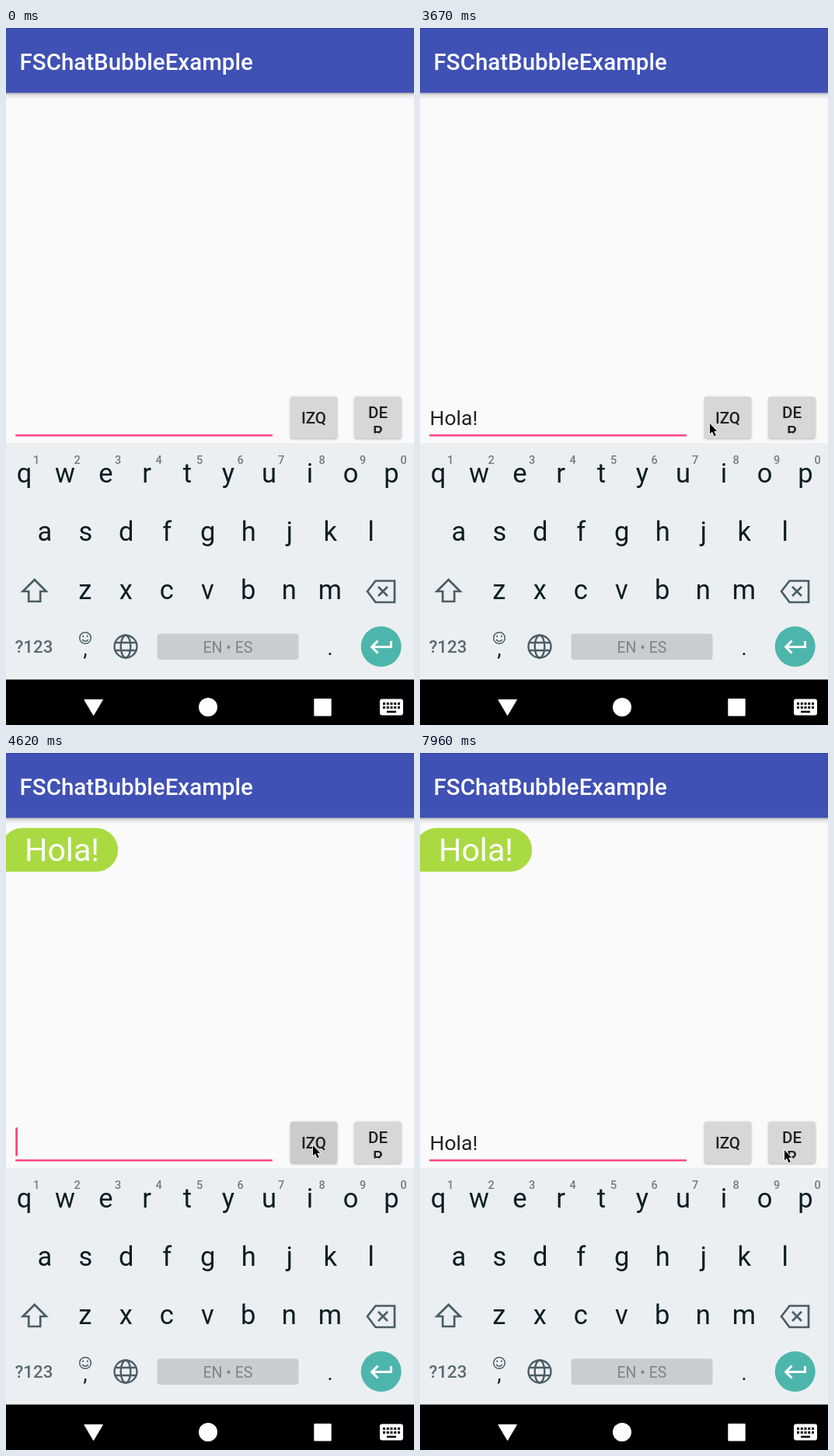
An HTML page that plays this animation: 525x897 px, repeating every 8 s.

```html
<!DOCTYPE html>
<html lang="es">
<head>
<meta charset="utf-8">
<title>Chat bubble demo</title>
<style>
html, body { margin: 0; width: 100%; height: 100%; overflow: hidden; background: #fafafa; }
svg { display: block; width: 525px; height: 897px; font-family: Roboto, sans-serif; }
.mid { text-anchor: middle; }
.label { font-size: 20.6px; font-weight: 500; fill: #202121; text-anchor: middle; }
.button { fill: #d6d7d7; filter: drop-shadow(0 1.5px 1.5px rgba(0,0,0,.3)); }
.key { font-size: 34.5px; fill: #0c1d24; text-anchor: middle; }
.digit { font-size: 14.5px; font-weight: 500; fill: #717b80; text-anchor: middle; }
.icon { fill: none; stroke: #4a5d67; stroke-width: 2.7; }
</style>
</head>
<body>
<svg viewBox="0 0 525 897">
  <defs>
    <linearGradient id="shade" x2="0" y2="1">
      <stop stop-color="#000" stop-opacity=".3"/>
      <stop offset=".4" stop-color="#000" stop-opacity=".09"/>
      <stop offset="1" stop-color="#000" stop-opacity="0"/>
    </linearGradient>
    <clipPath id="cut"><path d="M448 474h61v47.5h-61z"/></clipPath>
  </defs>

  <rect width="525" height="897" fill="#fafafa"/>
  <rect y="83" width="525" height="9" fill="url(#shade)"/>
  <rect width="525" height="83.4" fill="#4051b5"/>
  <rect width="525" height="1" fill="#303f9f"/>
  <text x="17.6" y="53.5" font-size="29.5" font-weight="500" fill="#fff">FSChatBubbleExample</text>

  <g id="bubble">
    <path d="M-7 152.8V124.6a28.1 28.1 0 0 1 28-28.1H116a28.1 28.1 0 0 1 0 56.3z" fill="#aada42"/>
    <text x="24" y="139.3" font-size="41.2" fill="#fff">Hola!</text>
  </g>

  <text id="entry" x="12.5" y="511" font-size="26.5" fill="#222"></text>
  <rect x="12" y="523" width="331" height="2.5" rx=".8" fill="#ff4586"/>
  <rect id="caret" y="482" width="2.8" height="36.5" fill="#ff4586"/>

  <rect class="button" x="366" y="474.5" width="60" height="53.5" rx="3"/>
  <rect id="press" x="366" y="474.5" width="60" height="53.5" rx="3" opacity="0"/>
  <rect class="button" x="448.5" y="474.5" width="60" height="53.5" rx="3"/>
  <text class="label" x="396" y="509">IZQ</text>
  <g clip-path="url(#cut)">
    <text class="label" x="478.5" y="502">DE</text>
    <text class="label" x="478.5" y="526.5">R</text>
  </g>

  <rect y="534" width="525" height="305" fill="#eceff1"/>
  <g id="keys"></g>
  <g class="icon">
    <path d="M36.7 710l-15 15h7.5v13h15v-13h7.5z"/>
    <path d="M465 725l10.5-13.5H500v27.5h-24.5zM479 719l12 12M491 719l-12 12"/>
    <g stroke-width="2.4">
      <circle cx="154" cy="796" r="14.5"/>
      <ellipse cx="154" cy="796" rx="6.3" ry="14.5"/>
      <path d="M141 791h26M141 801h26"/>
    </g>
    <g stroke-width="1.5">
      <circle cx="102" cy="785" r="7.3"/>
      <path d="M98 787q4 4.5 8 0M99.2 781.5v2.4M104.8 781.5v2.4"/>
    </g>
  </g>
  <text x="11.5" y="804" font-size="22.3" font-weight="500" fill="#5a6a73">?123</text>
  <text class="mid" x="102" y="808" font-size="27" fill="#0c1d24">,</text>
  <text class="mid" x="417" y="807" font-size="27" fill="#0c1d24">.</text>
  <rect x="194.5" y="779.5" width="182" height="33.5" rx="4" fill="#c9cdd0"/>
  <text class="mid" x="285.5" y="803.5" font-size="19.5" fill="#7b8489">EN • ES</text>
  <circle cx="482.7" cy="796" r="26" fill="#4db6ac"/>
  <path transform="translate(465.5 778.6) scale(1.5)" fill="#fff"
    d="M19 7v4H5.83l3.58-3.59L8 6l-6 6 6 6 1.41-1.41L5.83 13H21V7z"/>

  <rect y="838.5" width="525" height="59"/>
  <g fill="#fff">
    <path d="M100.8 864.5h23.6l-11.8 20z" stroke="#fff" stroke-linejoin="round"/>
    <circle cx="260" cy="874" r="12"/>
    <rect x="396.3" y="863" width="22.4" height="22.5" rx="1"/>
    <rect x="481" y="863.5" width="30" height="21" rx="3"/>
  </g>
  <path d="M485 869.5h22M485 874.5h22" stroke="#000" stroke-width="3" stroke-dasharray="3 1.75"/>
  <path d="M490 880h12" stroke="#000" stroke-width="2.5"/>

  <path id="pointer" d="M0 0V13.2L3 10.5L5.5 16.3L7.8 15.3L5.3 9.7H9.2z"
    stroke="#fff" stroke-width="1.4" paint-order="stroke"/>
</svg>
<script>
const LOOP = 8000, CARET_MS = 490, KEY_GAP = 52.5, WORD = 'Hola!';
const $ = id => document.getElementById(id);
const [bubble, entry, caret, press, pointer] =
  ['bubble', 'entry', 'caret', 'press', 'pointer'].map($);

const row = (cls, chars, x, y) => [...chars].map((c, i) =>
  `<text class="${cls}" x="${x + i * KEY_GAP}" y="${y}">${c}</text>`).join('');
$('keys').innerHTML =
  row('key', 'qwertyuiop', 23.5, 585) + row('key', 'asdfghjkl', 49.8, 660) +
  row('key', 'zxcvbnm', 101.8, 734.5) + row('digit', '1234567890', 39, 561);

const clamp = v => Math.max(0, Math.min(1, v));
const ramp = (t, from, to) => clamp((t - from) / (to - from));
const ease = p => p * p * (3 - 2 * p);

// Each action leaves a text in the field and shows the caret for a moment
const tap = at => ({ at, text: '' });
const type = (start, gap) => [...WORD].map((_, i) =>
  ({ at: start + gap * i ** 1.25, text: WORD.slice(0, i + 1) }));
const actions = [tap(690), ...type(1510, 110), tap(4430), tap(4920), tap(6090), ...type(6180, 121)];

const home = { x: 405, y: 880 };
const glides = [
  { from: 240, to: 690, x: 131, y: 498 },
  { from: 2640, to: 3670, x: 373, y: 509 },
  { from: 3670, to: 4430, x: 395, y: 505 },
  { from: 4630, to: 5110, x: 277, y: 502 },
  { from: 7320, to: 7960, x: 469, y: 511 },
];

function draw(t) {
  const last = actions.filter(a => a.at <= t).pop();
  entry.textContent = last ? last.text : '';
  caret.setAttribute('x', 12.2 + (last && last.text ? entry.getComputedTextLength() : 0));
  caret.style.opacity = last && t - last.at < CARET_MS ? 1 : 0;

  bubble.style.opacity = ramp(t, 4400, 4500);
  press.style.opacity = .1 * ramp(t, 4330, 4430) * (1 - ramp(t, 4520, 4750));

  let { x, y } = home;
  for (const g of glides) {
    const p = ease(ramp(t, g.from, g.to));
    x += (g.x - x) * p;
    y += (g.y - y) * p;
  }
  pointer.style.opacity = t < 240 ? 0 : 1;
  pointer.setAttribute('transform', `translate(${Math.round(x)} ${Math.round(y)})`);
}

const start = performance.now();
function tick() {
  draw((performance.now() - start) % LOOP);
  requestAnimationFrame(tick);
}
tick();
</script>
</body>
</html>
```
